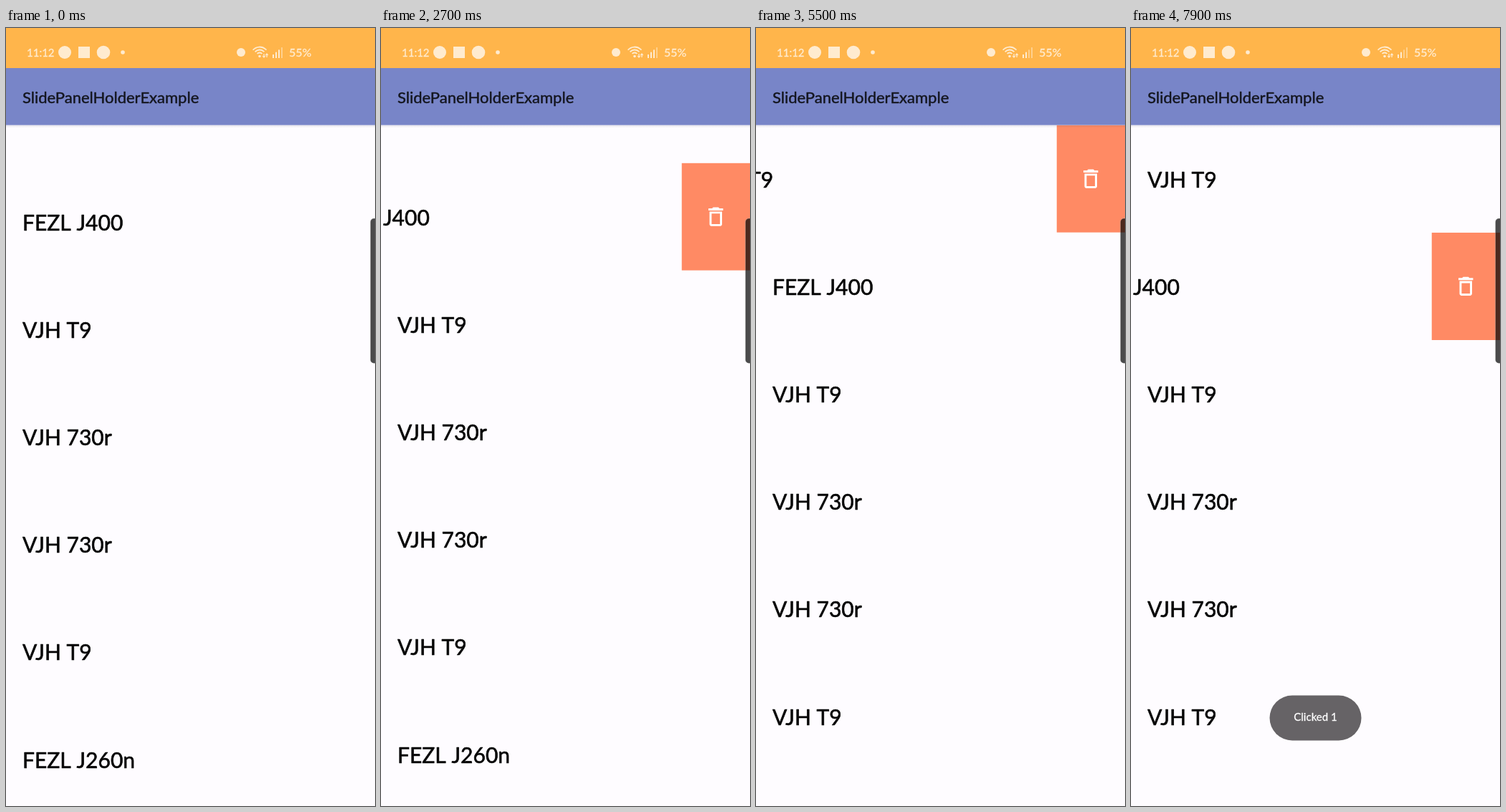
An HTML page with a canvas for the animation above (8 s loop, 515 by 1087 pixels).

```html
<!DOCTYPE html>
<html lang="en">
<head>
<meta charset="utf-8">
<title>Swipe list</title>
<style>
html, body { margin: 0; width: 100%; height: 100%; overflow: hidden; background: #fefcff; }
canvas { display: block; width: 100%; height: 100%; }
</style>
</head>
<body>
<canvas id="stage" width="515" height="1087"></canvas>
<script>
const W = 515, H = 1087, LOOP = 8000, STEP = 100;
const BAR_TOP = 56, BAR_BOTTOM = 135.6, ROW = 150.2, OPEN = 95.5;
const PALE = '#ffebcf';
const ctx = document.getElementById('stage').getContext('2d');
const rows = ['VJH T9', 'FEZL J400', 'VJH T9', 'VJH 730r', 'VJH 730r', 'VJH T9', 'FEZL J260n'];
const bin = new Path2D('M16 9v10H8V9h8m-1.5-6h-5l-1 1H5v2h14V4h-3.5l-1-1zM18 7H6v12c0 1.1.9 2 2 2h8c1.1 0 2-.9 2-2V7z');

// Linear interpolation through [time, value] keys, held at both ends.
function at(t, keys) {
  if (t <= keys[0][0]) return keys[0][1];
  for (let i = 1; i < keys.length; i++) {
    const [t0, a] = keys[i - 1], [t1, b] = keys[i];
    if (t <= t1) return a + (b - a) * (t - t0) / (t1 - t0);
  }
  return keys[keys.length - 1][1];
}

const scroll = [[0, 60], [100, 57], [200, 54.5], [300, 53], [3100, 53], [3200, 100], [3300, ROW]];
const swipes = [
  [[4300, 0], [4400, 9.8], [4500, 52], [4600, 88], [4700, OPEN], [6300, OPEN], [6400, 40], [6500, 0]],
  [[2300, 0], [2400, 10], [2500, 52], [2600, 88], [2700, OPEN], [3100, OPEN], [3200, 40], [3300, 0],
   [6300, 0], [6400, 56], [6500, OPEN]]
];
const glowDepth = [[3200, 0], [3300, 57], [3500, 84], [3900, 0]];
const glowAlpha = [[3200, 0], [3300, .12], [3500, .15], [3900, 0]];

// Finger paths: start, release, end, from and to points.
const touches = [
  { start: 2300, up: 2500, end: 2700, from: [375, 265], to: [215, 265] },
  { start: 3100, up: 3500, end: 3700, from: [321, 678], to: [329, 1061] },
  { start: 4300, up: 4500, end: 4700, from: [375, 233], to: [297, 231] },
  { start: 5200, up: 5300, end: 5500, from: [470, 212], to: [470, 212] },
  { start: 6300, up: 6400, end: 6600, from: [340, 361], to: [206, 361] },
  { start: 7100, up: 7200, end: 7400, from: [464, 392], to: [464, 392] }
];
const toasts = [
  { label: 'Clicked 0', half: 66, alpha: [[5500, 0], [5900, 1], [7500, 1], [7700, 0]] },
  { label: 'Clicked 1', half: 64, alpha: [[7600, 0], [7900, 1]] }
];

function rect(x, y, w, h, color) {
  ctx.fillStyle = color;
  ctx.fillRect(x, y, w, h);
}

function disc(x, y, r, color) {
  ctx.fillStyle = color;
  ctx.beginPath();
  ctx.arc(x, y, r, 0, Math.PI * 2);
  ctx.fill();
}

// A thin outline gives the strokes a slightly heavier, rounded look.
function text(str, x, y, size, color, align = 'left') {
  ctx.font = `${size}px Lato, "Open Sans", sans-serif`;
  ctx.textAlign = align;
  ctx.fillStyle = ctx.strokeStyle = color;
  ctx.lineWidth = size * .02;
  ctx.lineJoin = 'round';
  ctx.fillText(str, x, y);
  ctx.strokeText(str, x, y);
}

function line(points, width, color) {
  ctx.strokeStyle = color;
  ctx.lineWidth = width;
  ctx.beginPath();
  points.forEach(([x, y]) => ctx.lineTo(x, y));
  ctx.stroke();
}

// The icon keeps fixed margins, so a narrow gap mirrors and widens it.
function reveal(top, off) {
  const size = 35, margin = (OPEN - size) / 2, left = W - off;
  ctx.save();
  ctx.beginPath();
  ctx.rect(left, top, off, ROW);
  ctx.clip();
  rect(left, top, off, ROW, '#ff8a64');
  ctx.translate(left + margin, top + (ROW - size) / 2);
  ctx.scale((off - 2 * margin) / 24, size / 24);
  ctx.fillStyle = '#fff';
  ctx.fill(bin);
  ctx.restore();
}

function list(t) {
  const base = BAR_BOTTOM + at(t, scroll) - ROW;
  rows.forEach((name, i) => {
    const top = base + i * ROW;
    const off = swipes[i] ? at(t, swipes[i]) : 0;
    if (off > 0) reveal(top, off);
    text(name, 23 - off, top + 87, 30, '#050505');
  });
}

function glow(t) {
  const alpha = at(t, glowAlpha), r = 862;
  if (alpha > 0) disc(288, BAR_BOTTOM + at(t, glowDepth) - r, r, `rgba(130,160,185,${alpha})`);
}

function statusBar(t) {
  rect(0, 0, W, BAR_TOP, '#ffb54b');
  text('11:12', 29, 40, 15, PALE);
  disc(82, 34, 9, PALE);
  rect(101, 26, 16, 16, PALE);
  disc(136, 34, 9.3, PALE);
  disc(163, 34, 2.8, PALE);
  disc(328, 34, 6, PALE);

  ctx.strokeStyle = PALE;
  ctx.lineWidth = 1.8;
  for (const r of [4.5, 8.5, 12.5]) {
    ctx.beginPath();
    ctx.arc(354, 39, r, -Math.PI * .77, -Math.PI * .23);
    ctx.stroke();
  }
  disc(354, 39.5, 1.8, PALE);
  line([[360, 41], [360, 36]], 1.3, PALE);
  line([[358.3, 39], [360, 41], [361.7, 39]], 1.2, PALE);
  line([[364, 36], [364, 41]], 1.3, PALE);
  line([[362.3, 38], [364, 36], [365.7, 38]], 1.2, PALE);

  const strength = t < 3100 ? 3 : 2;
  for (let i = 0; i < 4; i++) {
    const h = 5 + i * 3.3;
    ctx.globalAlpha = i < strength ? 1 : .5;
    rect(372 + i * 4, 42 - h, 2, h, PALE);
  }
  ctx.globalAlpha = 1;
  text('55%', 395, 40, 16, PALE);
}

function appBar() {
  const shade = ctx.createLinearGradient(0, BAR_BOTTOM, 0, BAR_BOTTOM + 4);
  shade.addColorStop(0, 'rgba(60,60,90,.13)');
  shade.addColorStop(1, 'rgba(60,60,90,0)');
  rect(0, BAR_BOTTOM, W, 4, shade);
  rect(0, BAR_TOP, W, BAR_BOTTOM - BAR_TOP, '#7885c8');
  text('SlidePanelHolderExample', 23, 105, 22, '#14161f');
}

function finger(t, { start, up, end, from, to }) {
  if (t < start || t >= end) return;
  const [x, y] = [0, 1].map(i => at(t, [[start, from[i]], [up, to[i]]]));
  ctx.globalAlpha = at(t, [[up, 1], [end, 0]]);
  disc(x, y, 16, 'rgba(255,255,255,.5)');
  ctx.strokeStyle = '#c6cae6';
  ctx.lineWidth = 2;
  ctx.stroke();
  ctx.globalAlpha = 1;
}

function toast(t, { label, half, alpha }) {
  ctx.globalAlpha = at(t, alpha);
  ctx.fillStyle = '#666366';
  ctx.beginPath();
  ctx.roundRect(257.5 - half, 932.5, half * 2, 63, 31.5);
  ctx.fill();
  text(label, 257.5, 967.5, 15, '#fff', 'center');
  ctx.globalAlpha = 1;
}

function edgeHandle() {
  ctx.fillStyle = 'rgba(0,0,0,.7)';
  ctx.beginPath();
  ctx.roundRect(508.5, 266, 14, 202.5, 5);
  ctx.fill();
  ctx.strokeStyle = 'rgba(255,255,255,.25)';
  ctx.lineWidth = 1;
  ctx.stroke();
}

function draw(now) {
  const t = Math.floor(now % LOOP / STEP) * STEP;
  rect(0, 0, W, H, '#fefcff');
  list(t);
  glow(t);
  appBar();
  statusBar(t);
  toasts.forEach(item => toast(t, item));
  touches.forEach(item => finger(t, item));
  edgeHandle();
}

let begin;
function tick(now) {
  begin ??= now;
  draw(Math.max(0, now - begin));
  requestAnimationFrame(tick);
}
requestAnimationFrame(tick);
</script>
</body>
</html>
```
